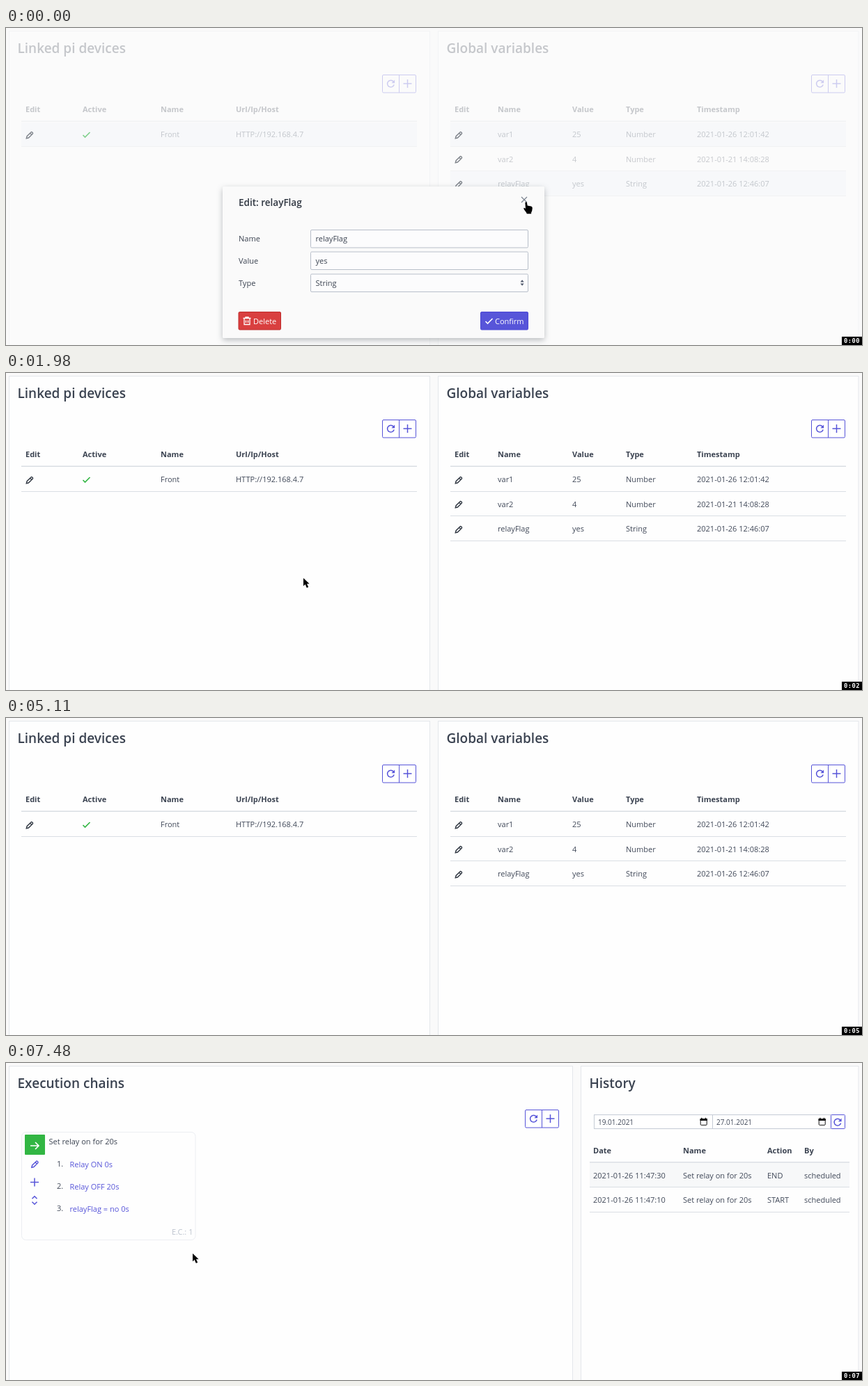
An HTML page that plays this animation: 1229 px wide and 456 px high, repeating every 8 s.

```html
<!DOCTYPE html>
<html lang="en">
<head>
<meta charset="utf-8">
<title>Device dashboard</title>
<style>
  html, body { margin: 0; width: 100%; height: 100%; overflow: hidden; background: #fafafa; }
  svg { display: block; width: 1229px; height: 456px; }
  text { font: 11px "Open Sans", "Noto Sans", sans-serif; fill: #414959; white-space: pre; }
  .head { font-weight: 700; fill: #3b4351; }
  .title { font-size: 19px; font-weight: 600; fill: #3b4351; }
  .sub { font-size: 13.5px; font-weight: 600; fill: #303742; }
  .note { font-size: 13.4px; font-weight: 600; fill: #66758c; text-anchor: middle; }
  .dark { fill: #3b4351; }
  .date { font-size: 10px; }
  .link { fill: #5755d9; }
  .pale { fill: #bcc3ce; }
  .white { fill: #fff; }
  .clock { font: 700 8.8px "DejaVu Sans Mono", monospace; letter-spacing: .45px; fill: #fff; }
  .line { fill: none; stroke-width: 1.5; }
</style>
</head>
<body>
<svg id="stage" viewBox="0 0 1229 456"></svg>
<script>
const BLUE = '#5755d9', GREEN = '#32b643', INK = '#303742', RULE = '#dadee4';

const text = (x, y, s, cls = '') => `<text x="${x}" y="${y}" class="${cls}">${s}</text>`;
const rect = (x, y, w, h, fill, stroke = 'none', r = 0) =>
  `<rect x="${x}" y="${y}" width="${w}" height="${h}" rx="${r}" fill="${fill}" stroke="${stroke}"/>`;
const icon = (x, y, d, color, width = 1.5) =>
  `<path class="line" transform="translate(${x} ${y})" d="${d}" stroke="${color}" style="stroke-width:${width}"/>`;

const PLUS = 'M-6 0H6M0-6V6';
const CHECK = 'M-5 0L-2 3L5-4';
const PENCIL = 'M-4.7 4.7l.8-3 5.8-5.8q.8-.8 1.6 0l.7.7q.8.8 0 1.6l-5.8 5.8zM.6-2.8l2.3 2.3';
const CROSS = 'M-4-4L4 4M-4 4L4-4';

const refresh = (x, y) => icon(x, y, 'M3.8-3A4.9 4.9 0 1 0 4.7 1.6', BLUE) +
  `<path transform="translate(${x} ${y})" d="M5.6-5.4V-.7H.9z" fill="${BLUE}"/>`;
const tools = x => rect(x, 67.5, 48, 25.5, '#fff', BLUE, 1.5) +
  rect(x + 23.5, 67.5, 1, 25.5, BLUE) + refresh(x + 12, 80) + icon(x + 36, 80, PLUS, BLUE);
const panel = (x, w, title) => rect(x, 4.5, w, 470, '#fefefe', '#e4e7eb') +
  text(x + 12, 36, title, 'title');

// cols: x positions; heads and rows: matching strings; headY: heading baseline
function table(x, w, headY, cols, heads, rows) {
  let out = rect(x, headY + 12.5, w, 1.5, RULE);
  heads.forEach((s, i) => out += text(cols[i], headY, s, 'head'));
  rows.forEach((row, r) => {
    const y = headY + 36 + r * 35.5;
    row.forEach((s, i) => out += text(cols[i], y, s));
    out += rect(x, Math.round(y + 12.9), w, 1, RULE);
  });
  return out;
}

const calendar = x => rect(x + .7, 80.7, 9, 8.6, 'none', '#111', 1) + rect(x, 80, 10.4, 3, '#111') +
  rect(x + 1.6, 78.8, 1.5, 2, '#111') + rect(x + 7.2, 78.8, 1.5, 2, '#111');
const dateBox = (x, w, s) => rect(x, 74.5, w, 20, '#fff', '#c5cbd5') +
  text(x + 5.5, 88.5, s, 'date') + calendar(x + 152);

const devices = panel(4.5, 604, 'Linked pi devices') + panel(620.5, 603.5, 'Global variables') +
  tools(540.5) + tools(1156.5) +
  text(28, 121, 'Edit', 'head') + text(644, 121, 'Edit', 'head') +
  table(22, 568, 121, [110, 222, 330], ['Active', 'Name', 'Url/Ip/Host'],
    [['', 'Front', 'HTTP://192.168.4.7']]) +
  table(638, 568, 121, [706, 813, 890, 992], ['Name', 'Value', 'Type', 'Timestamp'], [
    ['var1', '25', 'Number', '2021-01-26 12:01:42'],
    ['var2', '4', 'Number', '2021-01-21 14:08:28'],
    ['relayFlag', 'yes', 'String', '2021-01-26 12:46:07']]);
const rowIcons = icon(115.5, 154, CHECK, GREEN, 1.6) +
  [[34, 154], [650, 154], [650, 189], [650, 225]].map(([x, y]) => icon(x, y, PENCIL, INK, 1.4)).join('');

const field = (y, label, value) => text(334, y + 17, label, 'dark') +
  rect(437.5, y + .5, 312, 25.5, '#fcfcfd', '#b8bfca', 1.5) + text(444.5, y + 17, value, 'dark');
const button = (x, w, fill, edge, tx, label) => rect(x, 408.5, w, 25.5, fill, edge, 1.5) +
  text(tx, 425.5, label, 'white');

const modal = `<g style="filter:drop-shadow(0 3px 4px rgba(48,55,66,.32))">${rect(311, 228, 462, 218, '#fafafa', 'none', 1.5)}</g>` +
  text(334, 256, 'Edit: relayFlag', 'sub') + icon(744, 247, CROSS, '#7d8591', 1.2) +
  field(290, 'Name', 'relayFlag') + field(321.5, 'Value', 'yes') + field(353.5, 'Type', 'String') +
  '<path d="M738.5 365.5l2.6-3.2 2.6 3.2zM738.5 367.5l2.6 3.2 2.6-3.2z" fill="#50596c"/>' +
  button(334, 60.5, '#d93f3f', '#bf2c2c', 355, 'Delete') +
  icon(346, 421.5, 'M-5.5-4H5.5M-2-4V-5.5H2V-4M-4-4V5H4V-4M-1.5-1V2.5M1.5-1V2.5', '#fff', 1.3) +
  button(681.5, 68, BLUE, '#4b48d6', 702, 'Confirm') + icon(693.5, 422, CHECK, '#fff', 1.6);

const chainsPage = panel(4.5, 809, 'Execution chains') + panel(825.5, 398.5, 'History') + tools(745.5) +
  dateBox(844.5, 170, '19.01.2021') + dateBox(1014.5, 170, '27.01.2021') +
  rect(1184.5, 74.5, 20, 20, '#fff', BLUE, 1) + refresh(1194, 85);

const noData = icon(1024.5, 177, 'M-16.5-16.5L16.5 16.5M-16.5 16.5L16.5-16.5', '#66708c', 1.6) +
  text(1024.8, 228, 'There are is no data in the selected range', 'note');

const steps = ['Relay ON 0s', 'Relay OFF 20s', 'relayFlag = no 0s'];
const chain = rect(22.5, 99.5, 249.5, 155, '#fefefe', '#eceef2', 6) +
  rect(27, 103, 29, 29, GREEN, 'none', 1) +
  icon(41, 119, 'M-6 0H6M1-5L6 0L1 5', '#fff', 1.6) +
  icon(41.5, 145.5, PENCIL, BLUE, 1.4) + icon(41, 171.5, PLUS, BLUE) +
  icon(41, 197.5, 'M-3.5-2.2L0-5.7L3.5-2.2M-3.5 2.2L0 5.7L3.5 2.2', BLUE) +
  text(61.5, 116.5, 'Set relay on for 20s', 'dark') +
  steps.map((s, i) => text(73, 149 + i * 32, `${i + 1}.`) + text(91.5, 150 + i * 32, s, 'link')).join('') +
  text(238, 246.5, 'E.C.: 1', 'pale') +
  rect(838, 144, 373, 35, '#f7f8f9') +
  table(838, 373, 129.5, [843, 972, 1093, 1146], ['Date', 'Name', 'Action', 'By'], [
    ['2021-01-26 11:47:30', 'Set relay on for 20s', 'END', 'scheduled'],
    ['2021-01-26 11:47:10', 'Set relay on for 20s', 'START', 'scheduled']]);

const stripes = rect(22, 136, 568, 34, '#f5f7f9') + rect(638, 136, 568, 34, '#f5f7f9') +
  rect(638, 206, 568, 35, '#f5f7f9');

const group = (id, body) => `<g id="${id}">${body}</g>`;
document.getElementById('stage').innerHTML = rect(0, 0, 1229, 456, '#fafafa') +
  group('stripes', stripes) + group('devices', devices) + group('rowIcons', rowIcons) + group('modal', modal) +
  group('chainsPage', chainsPage) + group('noData', noData) + group('chain', chain) +
  group('hand', '<path d="M745.4 251.2q1.2-1.8 2.5 0l.8 4.3 5.4 1q1.7.6 1.7 2.6l-.6 4-1.1 2.4v1.7h-6.3l-.7-1.7-3.2-4.2-.7-2.2q1.2-1 2.8.8z"/>') +
  group('arrow', '<path d="M0 0V11.4L2.6 9L4.8 14L7.2 13L5 8.3H8.6z"/>') +
  rect(1200, 444, 29, 12, '#000') + '<text id="clock" class="clock" x="1203" y="453"></text>';

const el = id => document.getElementById(id);
const show = (id, on) => el(id).style.display = on ? '' : 'none';

const LOOP = 8000;
// time, then arrow tip; no tip means no arrow
const pointer = [
  [0], [280, 747, 250], [1610, 601, 276], [1880, 427, 295], [2240, 381, 290], [2510, 220, 290],
  [2760, 145, 290], [3020, 74, 290], [3390, 16, 285], [3660, 18, 282], [3920],
  [5380, 98, 214], [5650, 224, 248], [5910, 262, 270], [6180, 266, 273], [6540, 267, 273],
  [7110, 268, 273], [7480, 268, 274]
];
const ticks = [800, 1980, 3120, 4020, 5110, 6280, 7210];

function draw(t) {
  const editing = t < 530, chains = t >= 5380, loaded = t >= 6180;
  ['stripes', 'modal'].forEach(id => show(id, editing));
  ['devices', 'rowIcons'].forEach(id => show(id, !chains));
  el('devices').style.opacity = editing ? .27 : 1;
  el('rowIcons').style.opacity = editing ? .6 : 1;
  show('chainsPage', chains);
  show('noData', chains && !loaded);
  show('chain', loaded);
  show('hand', t < 280);
  const [, x, y] = pointer.findLast(p => p[0] <= t);
  show('arrow', x !== undefined);
  if (x !== undefined) el('arrow').setAttribute('transform', `translate(${x} ${y})`);
  el('clock').textContent = '0:0' + ticks.filter(s => s <= t).length;
}

const start = performance.now();
function frame() {
  draw((performance.now() - start) % LOOP);
  requestAnimationFrame(frame);
}
frame();
</script>
</body>
</html>
```
